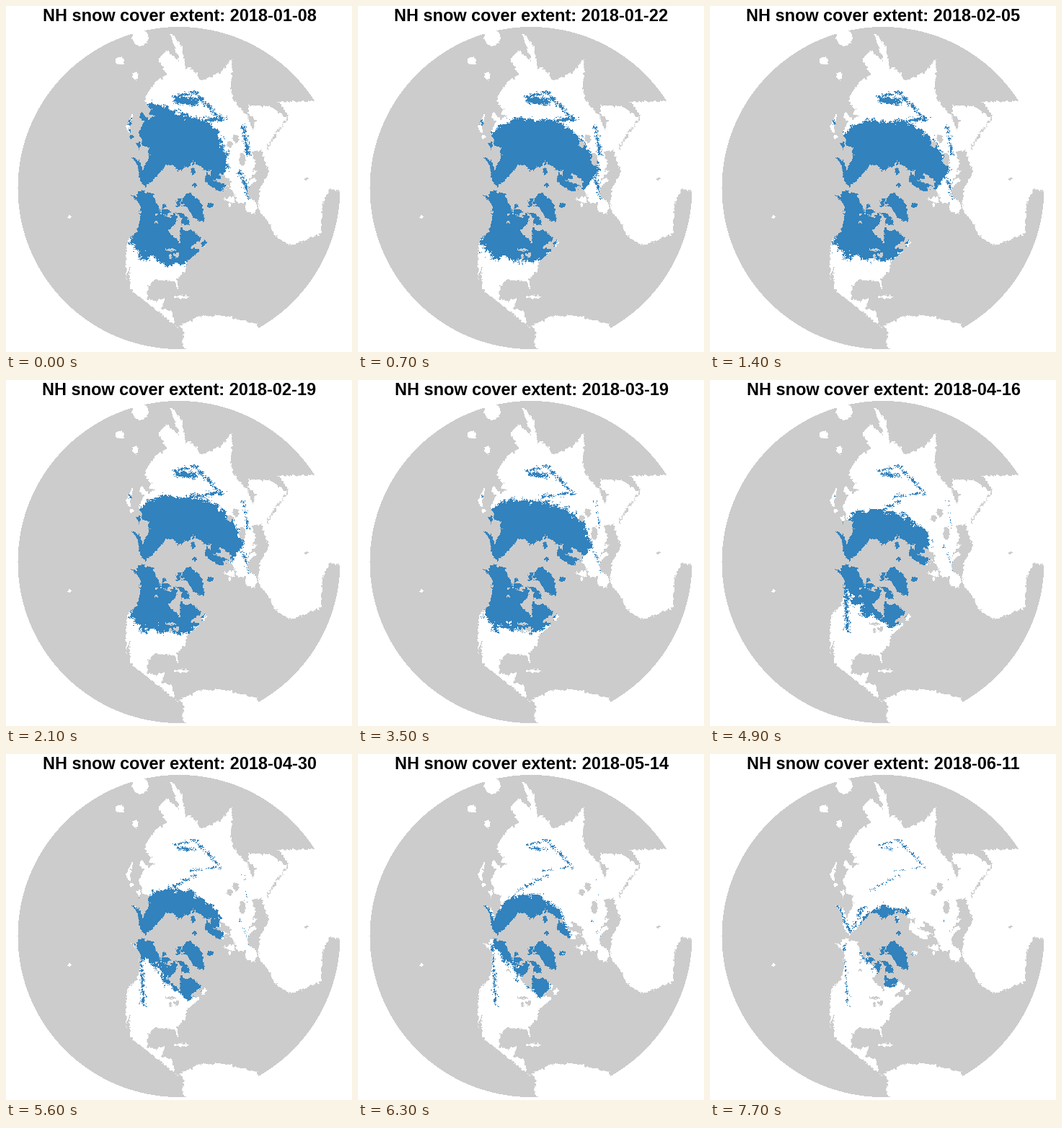
Recreate the animation shown at these times as a matplotlib script. Size 480 px wide and 480 px high, loop 8 s.

```python
import numpy as np
import matplotlib.pyplot as plt
from matplotlib.animation import FuncAnimation
from matplotlib.path import Path

SIZE, CX, CY, RADIUS = 480, 239.5, 252, 223.5
SEA, LAND, SNOW = "#cccccc", "#ffffff", "#3182bd"
START, STEPS, HOLD = np.datetime64("2018-01-08"), 12, 7

# Coastlines as (lon, lat)
siberia = [(190, 66), (176, 69.8), (140, 72.5), (129, 71.5), (113, 73.8), (104, 77.7),
           (75, 72.8), (74, 68), (69, 72.5), (67, 69), (44, 68), (38, 64), (33, 66.7),
           (41, 67), (26, 71)]
europe = [(15, 68.3), (5, 61), (7, 58), (10.7, 59.3), (13, 55.4), (17.5, 61), (23, 65.6),
          (22, 60.5), (29.5, 60), (20, 54.5), (10, 54.2), (9.5, 57.5), (8.5, 53.7),
          (-4.7, 48.4), (-1.5, 43.4), (-9, 43.2), (-9, 37)]
mediterranean = [(-2, 36.8), (3.2, 42.8), (9, 44.3), (15.8, 38), (18.4, 40), (12.8, 45),
                 (19.4, 41.5), (22.5, 36.5), (23, 40.4), (27, 37), (36, 36.5),
                 (34.5, 31.3), (20, 31), (10.5, 36.5), (-5.5, 35.6)]
africa = [(-9.8, 30), (-17, 21.5), (-17.2, 14), (-8, 4.4), (4.4, 6.2), (9.5, 4), (9, -1),
          (26, -25), (42, -1), (51.2, 11.8), (43.3, 11.5), (33, 29.5)]
arabia = [(35, 28), (43.3, 12.7), (52, 15.6), (59.8, 22.5), (56.3, 26), (51.5, 24.5),
          (48, 29.8), (57, 26.5), (66.5, 25.3)]
south_asia = [(72.5, 20.5), (77.5, 8.1), (80.2, 15), (88, 21.6), (94.3, 16), (97, 17),
              (98.5, 8), (103.5, 1.3), (100, 13.4), (105, 8.9), (109.2, 12), (106, 19.5)]
east_asia = [(113, 22), (121.8, 29.5), (119.3, 35), (122.4, 37.2), (118, 39.2),
             (124.5, 39.8), (126.5, 34.4), (129.3, 36), (128, 39.8), (135, 44), (141, 52),
             (136, 55), (143, 59.3), (163, 62), (156, 57), (156.6, 51), (163, 58),
             (180, 62.6)]
canada = [(-168, 65.6), (-162, 66.3), (-157, 71.3), (-128, 70.2), (-114, 68), (-96, 68.2),
          (-94, 71.5), (-81.5, 69), (-87, 65), (-94.7, 59), (-82.3, 55), (-79.5, 51.3),
          (-77.5, 62.3), (-69.5, 59.5), (-64.5, 60.3), (-55.8, 52.3), (-69, 48.5),
          (-61.2, 45.6), (-70.2, 42.5)]
gulf = [(-74, 40.5), (-75.6, 35.5), (-81.2, 31.5), (-80.4, 25.5), (-83, 29.5), (-94, 29.6),
        (-97.5, 25), (-96, 18.8), (-91, 18.7), (-87, 21.3), (-88.5, 15.8), (-83.3, 15),
        (-82, 9)]
pacific = [(-80, 8), (-87.6, 13), (-105.6, 20.3), (-113, 31), (-109.7, 23.2),
           (-117.2, 32.7), (-124.2, 40.4), (-124, 49), (-133, 56.5), (-146, 60.8),
           (-152, 59.5), (-164.5, 54.7), (-158, 58.7), (-165, 62)]
south_america = [(-80, 9), (-72, 12), (-62, 10.7), (-50, 1.5), (-65, -25), (-78.8, 1.6),
                 (-78, 7)]
greenland = [(-72, 78), (-60, 82), (-32, 83.5), (-12, 81.5), (-25, 70), (-43.5, 60),
             (-53, 67), (-58, 75.5)]
baffin = [(-64.5, 63), (-77, 64.5), (-73, 68), (-89, 73), (-75, 72), (-62, 67)]
ellesmere = [(-90, 76.5), (-76, 77), (-62, 82.5), (-92, 81)]
britain = [(-5.5, 50.1), (1.5, 51.5), (-3, 58.6), (-5, 55)]
honshu = [(131, 33), (140.8, 35.7), (142, 41), (137, 37)]

# Ellipses as (lon, lat, half width, half height), the last two in pixels
isles = [(-19, 65, 4, 3), (-8, 53.2, 2, 3), (18, 78.7, 3, 2.5), (60, 74.5, 3, 5),
         (-121, 73.2, 3.5, 3), (-109, 71, 6, 4), (-56, 48.7, 4, 4), (143, 50, 2, 6),
         (143, 43.3, 3, 3), (-155.5, 19.7, 2, 2), (121.3, 16.5, 4, 6), (125, 8, 6, 6),
         (114.5, 2, 11, 12), (-79, 21.8, 10, 2)]
lakes = [(34.5, 43.3, 4, 10), (50.5, 45, 5, 4), (51, 40, 4, 6), (-87.5, 47.6, 7, 2.5),
         (-87, 43.7, 2, 4.5), (-82, 45, 4, 3), (-121, 66, 2, 2), (-114, 61.8, 3, 1.5),
         (14, 13.3, 3, 2)]

# Reach of the snow from the pole by longitude, in pixels at the key steps
KEYS = (0, 1, 5, 8, 11)
limits = {
    -150: (85, 85, 80, 62, 32), -115: (104, 108, 100, 54, 38), -90: (107, 102, 95, 68, 50),
    -72: (106, 100, 96, 90, 72), -20: (56, 56, 56, 54, 48), 10: (64, 74, 65, 62, 38),
    25: (67, 98, 88, 58, 34), 45: (80, 95, 92, 62, 32), 70: (98, 99, 88, 61, 38),
    100: (104, 97, 84, 65, 46), 120: (128, 98, 92, 68, 38), 150: (95, 90, 90, 74, 35)}

# Mountain snow: a line on the stage, half width at the first and last step
ranges = [
    ([(234, 126), (262, 120), (297, 157)], 1.8, 0),
    ([(238, 130), (262, 132)], 5, -1),
    ([(255, 162), (300, 155)], 3, -1.5),
    ([(222, 188), (262, 168)], 3.5, -0.5),
    ([(329, 168), (335, 205)], 2, -4),
    ([(324, 230), (337, 265)], 2, -2.5),
    ([(171, 158), (193, 195)], 3, -5),
    ([(175, 209), (195, 247), (212, 212)], 9, 1.5),
    ([(186, 262), (190, 347)], 6, 0),
    ([(236, 216), (272, 218)], 6, 3)]

ys, xs = np.mgrid[:SIZE, :SIZE].astype(float)
pole_dist = np.hypot(xs - CX, ys - CY)
lon = np.degrees(np.arctan2(xs - CX, ys - CY)) - 80
disk = pole_dist <= RADIUS
rng = np.random.default_rng(8)


def noise(n):
    """White noise blurred over n neighbours on each side, with unit spread."""
    a = rng.normal(size=(SIZE, SIZE))
    for axis in (0, 1):
        a = sum(np.roll(a, k, axis) for k in range(-n, n + 1))
    return a / a.std()


# Small wobble that roughens the straight coast segments
wx, wy = xs + 0.8 * noise(1), ys + 0.8 * noise(1)
grid = np.column_stack([wx.ravel(), wy.ravel()])


def project(lo, la):
    """Polar stereographic projection, 80 W pointing down."""
    r = RADIUS * np.tan(np.pi / 4 - np.radians(la) / 2)
    a = np.radians(lo + 80)
    return CX + r * np.sin(a), CY + r * np.cos(a)


def polygon(points):
    path = Path([project(*p) for p in points])
    return path.contains_points(grid).reshape(SIZE, SIZE)


def ellipse(lo, la, w, h):
    x, y = project(lo, la)
    return ((wx - x) / w) ** 2 + ((wy - y) / h) ** 2 < 1


def line_dist(points):
    best = np.full((SIZE, SIZE), 1e9)
    for (x0, y0), (x1, y1) in zip(points, points[1:]):
        dx, dy = x1 - x0, y1 - y0
        t = np.clip(((xs - x0) * dx + (ys - y0) * dy) / (dx * dx + dy * dy), 0, 1)
        best = np.minimum(best, np.hypot(xs - x0 - t * dx, ys - y0 - t * dy))
    return best


old_world = siberia + europe + mediterranean + africa + arabia + south_asia + east_asia
new_world = canada + gulf + pacific
land = np.zeros((SIZE, SIZE), bool)
for shape in (old_world, new_world, south_america, greenland, baffin, ellesmere, britain,
              honshu):
    land |= polygon(shape)
for isle in isles:
    land |= ellipse(*isle)
for lake in lakes:
    land &= ~ellipse(*lake)
land &= disk
ice = polygon(greenland)

fine = 0.6 * noise(1) + 0.7 * noise(0)
rough = 1.6 * fine + 1.8 * noise(3)
rough *= np.where((lon < -95) & (lon > -135), 1.8, 1)
range_dist = [line_dist(points) + 1.9 * fine for points, _, _ in ranges]


def rgb(color):
    return [int(color[k:k + 2], 16) for k in (1, 3, 5)]


def scene(step):
    reach = [np.interp(step, KEYS, v) for v in limits.values()]
    snow = ice | (pole_dist + rough < np.interp(lon, list(limits), reach, period=360))
    for dist, (_, first, last) in zip(range_dist, ranges):
        snow |= dist < first + (last - first) * step / (STEPS - 1)
    img = np.full((SIZE, SIZE, 3), 255, np.uint8)
    img[disk] = rgb(SEA)
    img[land] = rgb(LAND)
    img[land & snow] = rgb(SNOW)
    return img


scenes = [scene(k) for k in range(STEPS)]

fig = plt.figure(figsize=(4.8, 4.8), dpi=100, facecolor="white")
ax = fig.add_axes([0, 0, 1, 1])
ax.axis("off")
picture = ax.imshow(scenes[0], interpolation="nearest", aspect="auto")
title = fig.text(240.5 / SIZE, 1 - 21 / SIZE, "", ha="center", va="baseline", color="black",
                 family="Liberation Sans", weight="bold", size=16.88)


def update(i):
    step = min(i // HOLD, STEPS - 1)
    picture.set_data(scenes[step])
    title.set_text(f"NH snow cover extent: {START + 14 * step}")
    return picture, title


anim = FuncAnimation(fig, update, frames=80, interval=100, repeat=True, repeat_delay=0)
plt.show()
```
